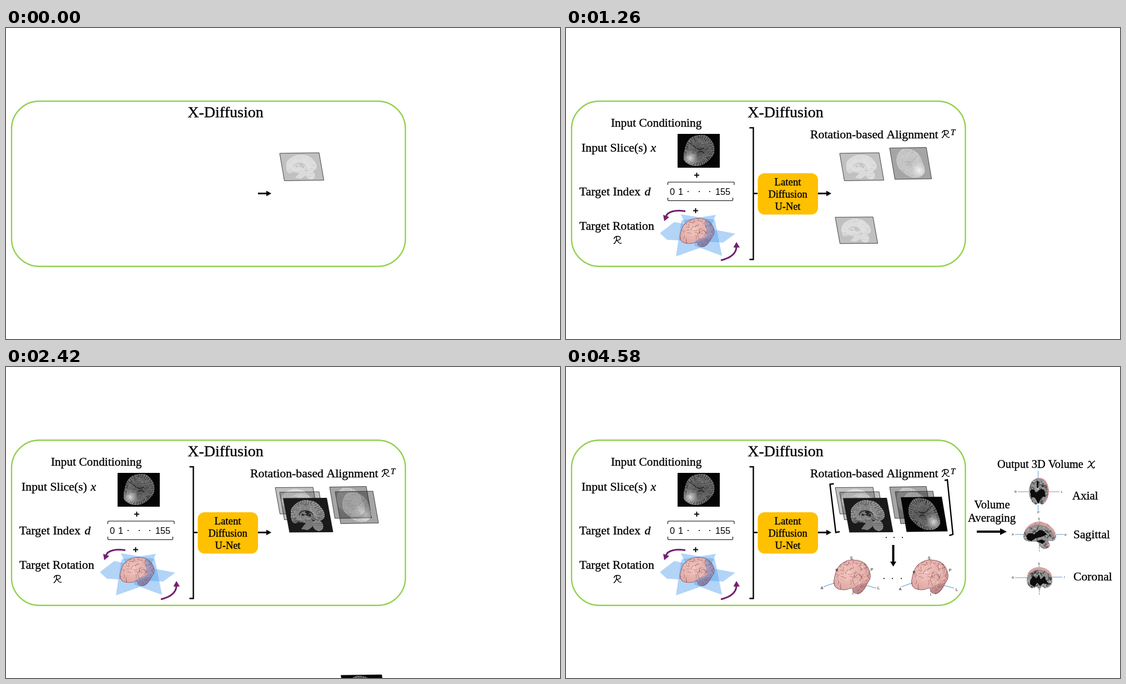
Animation of 998x561 px, one loop 5 s. Source, as an HTML page with a canvas:

```html
<!DOCTYPE html>
<html lang="en">
<head>
<meta charset="utf-8">
<title>X-Diffusion</title>
<style>
html, body { margin: 0; width: 100%; height: 100%; overflow: hidden; background: #fff; }
canvas { display: block; width: 998px; height: 561px; }
</style>
</head>
<body>
<canvas id="stage" width="998" height="561"></canvas>
<script>
const W = 998, H = 561, LOOP = 5000, STEP = 40;
const ctx = document.getElementById('stage').getContext('2d');
const SERIF = '"Liberation Serif", "Times New Roman", serif';
const SANS = '"Liberation Sans", Arial, sans-serif';
const BLUE = '#5b9bd5', PURPLE = '#74206f';

// ---------- helpers ----------
const rng = s => () => (s = s * 16807 % 2147483647) / 2147483647;

function closed(pts) {
  const p = new Path2D(), n = pts.length, at = i => pts[(i + n) % n];
  p.moveTo(...pts[0]);
  for (let i = 0; i < n; i++) {
    const [a, b, c, d] = [at(i - 1), at(i), at(i + 1), at(i + 2)];
    p.bezierCurveTo(b[0] + (c[0] - a[0]) / 6, b[1] + (c[1] - a[1]) / 6,
      c[0] - (d[0] - b[0]) / 6, c[1] - (d[1] - b[1]) / 6, c[0], c[1]);
  }
  p.closePath();
  return p;
}

function sprite(w, h, draw) {
  const el = document.createElement('canvas'), k = 3;
  el.width = w * k;
  el.height = h * k;
  const c = el.getContext('2d');
  c.scale(k, k);
  c.lineCap = c.lineJoin = 'round';
  draw(c, w, h);
  return el;
}

function glow(c, x, y, r, inner, outer) {
  const g = c.createRadialGradient(x, y, 0, x, y, r);
  g.addColorStop(0, inner);
  g.addColorStop(1, outer);
  return g;
}

function squiggles(c, w, h, n, len, color, width, seed) {
  const r = rng(seed);
  c.strokeStyle = color;
  c.lineWidth = width;
  for (let i = 0; i < n; i++) {
    const x = r() * w, y = r() * h, a = r() * 6.28, b = a + (r() - 0.5) * 3;
    const mx = x + Math.cos(a) * len, my = y + Math.sin(a) * len;
    c.beginPath();
    c.moveTo(x, y);
    c.quadraticCurveTo(mx, my, mx + Math.cos(b) * len, my + Math.sin(b) * len);
    c.stroke();
  }
}

function furrows(c, pts, cx, cy, depth, color, width) {
  const r = rng(71);
  c.strokeStyle = color;
  c.lineWidth = width;
  c.beginPath();
  pts.forEach(([x, y], i) => {
    const [nx, ny] = pts[(i + 1) % pts.length];
    for (const f of [0, 0.33, 0.67]) {
      const px = x + (nx - x) * f, py = y + (ny - y) * f, d = depth * (0.5 + r());
      c.moveTo(px, py);
      c.quadraticCurveTo(px + (cx - px) * d * 0.5 + r() * 4 - 2, py + (cy - py) * d * 0.5 + r() * 4 - 2,
        px + (cx - px) * d, py + (cy - py) * d);
    }
  });
  c.stroke();
}

// ---------- scans ----------
const axialPts = [[16, 41], [21, 23], [32, 9], [49, 3], [67, 4], [80, 15], [87, 31],
  [86, 47], [78, 59], [67, 69], [51, 76], [32, 75], [17, 65], [14, 53]];
const axial = sprite(100, 80, (c, w, h) => {
  c.fillStyle = '#050505';
  c.fillRect(0, 0, w, h);
  const p = closed(axialPts);
  c.clip(p);
  c.fillStyle = glow(c, 54, 38, 46, '#4c4c4c', '#7d7d7d');
  c.fillRect(0, 0, w, h);
  squiggles(c, w, h, 100, 4, 'rgba(160,160,160,.3)', 1.6, 12);
  squiggles(c, w, h, 45, 4, 'rgba(20,20,20,.5)', 1.3, 45);
  furrows(c, axialPts, 52, 40, 0.2, 'rgba(10,10,10,.7)', 1.2);
  c.fillStyle = glow(c, 30, 58, 20, 'rgba(235,235,235,.85)', 'rgba(200,200,200,0)');
  c.fillRect(0, 0, w, h);
  c.strokeStyle = 'rgba(15,15,15,.7)';
  c.lineWidth = 2;
  c.stroke(new Path2D('M46 35q8 4 16 -1M50 44q5 -5 12 1M36 27q5 3 7 8'));
});

const sagPts = [[10, 46], [13, 28], [23, 16], [36, 8], [51, 5], [71, 9], [83, 22],
  [88, 37], [84, 48], [74, 53], [60, 51], [52, 56], [40, 58], [28, 56], [19, 59], [12, 56]];
const sagittal = sprite(100, 80, (c, w, h) => {
  c.fillStyle = '#1a1a1a';
  c.fillRect(0, 0, w, h);
  c.fillStyle = '#777';
  c.fill(new Path2D('M48 50L60 54L55 67L43 75L28 72L37 63Z'));
  c.beginPath();
  c.ellipse(68, 64, 12, 13, 0, 0, 7);
  c.fillStyle = '#858585';
  c.fill();
  c.strokeStyle = '#555';
  c.lineWidth = 0.8;
  c.stroke(new Path2D('M58 60h20M57 64h22M58 68h20M60 72h15'));
  c.clip(closed(sagPts));
  c.fillStyle = glow(c, 45, 35, 46, '#797979', '#9a9a9a');
  c.fillRect(0, 0, w, h);
  squiggles(c, w, h, 90, 4, 'rgba(185,185,185,.3)', 1.6, 31);
  squiggles(c, w, h, 35, 4, 'rgba(40,40,40,.4)', 1.2, 83);
  furrows(c, sagPts, 46, 36, 0.24, 'rgba(30,30,30,.65)', 1.1);
  c.strokeStyle = '#333';
  c.lineWidth = 2.4;
  c.stroke(new Path2D('M30 39q5 -11 19 -9q9 1 12 9'));
  c.fillStyle = '#252525';
  c.beginPath();
  c.ellipse(50, 34, 6, 3.5, 0.3, 0, 7);
  c.ellipse(38, 39, 3, 2.5, 0, 0, 7);
  c.ellipse(59, 43, 4, 2, 0.7, 0, 7);
  c.fill();
});

// ---------- surface brains ----------
const brainPts = [[3, 47], [4, 33], [10, 17], [23, 6], [39, 3], [56, 8], [66, 21], [68, 35],
  [63, 45], [56, 57], [47, 64], [38, 61], [35, 54], [22, 57], [10, 55]];
const brainPath = closed(brainPts);
const brain = sprite(71, 68, (c, w, h) => {
  c.fillStyle = glow(c, 28, 26, 46, '#f3c4bd', '#d79d9b');
  c.fill(brainPath);
  c.save();
  c.clip(brainPath);
  squiggles(c, w, h, 85, 4.5, 'rgba(150,92,94,.65)', 0.9, 7);
  squiggles(c, w, h, 50, 3.5, 'rgba(255,222,215,.6)', 1.2, 19);
  c.fillStyle = 'rgba(120,75,85,.3)';
  c.fill(new Path2D('M36 54L50 46L66 43L60 62L40 66Z'));
  c.restore();
  c.strokeStyle = '#8f6267';
  c.lineWidth = 1;
  c.stroke(brainPath);
});

// Cut volume: pink cortex with a grey section in front.
function section(w, h, pts, shift, holes, seed) {
  const path = closed(pts);
  return sprite(w, h, c => {
    c.fillStyle = '#d9a3a1';
    c.fill(path);
    c.clip(path);
    squiggles(c, w, h, 35, 3, 'rgba(130,80,85,.6)', 0.8, seed);
    c.translate(...shift);
    c.clip(path);
    c.fillStyle = '#929292';
    c.fillRect(0, 0, w, h);
    squiggles(c, w, h, 60, 3, 'rgba(40,40,40,.55)', 1.8, seed + 5);
    squiggles(c, w, h, 30, 3, 'rgba(210,210,210,.5)', 1.6, seed + 9);
    c.fillStyle = '#0c0c0c';
    c.fill(new Path2D(holes));
  });
}
const cutAxial = section(38, 52,
  [[1, 28], [3, 14], [9, 5], [19, 1], [29, 4], [35, 14], [37, 28], [33, 41], [26, 49], [19, 47], [12, 49], [5, 41]],
  [-2, 1], 'M5 24q4 -7 9 0q2 5 5 0q6 -7 12 -1l2 12q-6 -3 -9 3l-4 9l-5 -9q-3 -5 -8 -2zM17 6h3v12h-3z', 101);
const cutSagittal = section(61, 51,
  [[1, 28], [4, 16], [13, 6], [28, 1], [44, 5], [56, 16], [60, 29], [54, 36], [46, 36], [49, 45], [40, 50], [32, 47], [27, 38], [14, 37], [5, 35]],
  [-2, 5], 'M8 22q6 -9 14 -3l10 -8q9 1 13 8l-8 4l-12 3l-8 5l-7 -3zM28 31l8 -3l6 3l-5 5z', 211);
const cutCoronal = section(48, 44,
  [[1, 26], [3, 13], [11, 4], [23, 1], [36, 4], [45, 13], [47, 26], [43, 35], [34, 39], [28, 36], [24, 42], [19, 37], [10, 39], [4, 34]],
  [0, 5], 'M7 20l6 -9l5 6l5 -8l3 9l7 -6l2 6l5 9l-9 -2l-6 5l-5 -6l-5 7l-8 -4z', 307);

// ---------- drawing ----------
function stroke(d, width, color = '#000') {
  ctx.strokeStyle = color;
  ctx.lineWidth = width;
  ctx.stroke(new Path2D(d));
}

function fill(d, color) {
  ctx.fillStyle = color;
  ctx.fill(new Path2D(d));
}

function label(s, x, y, size, align = 'left', style = '', family = SERIF) {
  ctx.font = `${style} ${size}px ${family}`;
  ctx.textAlign = align;
  ctx.fillStyle = ctx.strokeStyle = '#000';
  ctx.fillText(s, x, y);
  if (family === SERIF) {
    ctx.lineWidth = 0.35;
    ctx.strokeText(s, x, y);
  }
}

const tiny = (s, x, y, size = 7) => label(s, x, y + size * 0.36, size, 'center', '', SANS);

function script(d, x, y) {
  ctx.save();
  ctx.translate(x, y);
  stroke(d, 1.5);
  ctx.restore();
}
const scriptR = 'M6 1.5C7 6 5 12 1 14.5M1.5 5.5C2 0 13 -1 13 4C12.5 8 8 8 6 8C9.5 8 9 15.5 15 13';
const scriptX = 'M2 3.5C5 -1 6.5 4 7.5 8C8.5 13 10.5 17 13.5 12M14 1.5C9 2 5 14 0 14';

function arrow(x1, y1, x2, y2, width, head, half) {
  const len = Math.hypot(x2 - x1, y2 - y1), ux = (x2 - x1) / len, uy = (y2 - y1) / len;
  const bx = x2 - ux * head, by = y2 - uy * head;
  stroke(`M${x1} ${y1}L${bx + ux} ${by + uy}`, width);
  fill(`M${x2} ${y2}L${bx - uy * half} ${by + ux * half}L${bx + uy * half} ${by - ux * half}Z`, '#000');
}

function dots(xs, y, r) {
  ctx.fillStyle = '#000';
  for (const x of xs) {
    ctx.beginPath();
    ctx.arc(x, y, r, 0, 7);
    ctx.fill();
  }
}

const plus = (x, y) => stroke(`M${x - 4.5} ${y}h9M${x} ${y - 4.5}v9`, 1.9);

// Slice: image, alpha, top left corner, top edge vector, side edge vector
const slices = [
  [sagittal, 0.28, 493, 226, 71, -1, 8.5, 49.5],
  [axial, 0.36, 583, 216.5, 66, -1, 9.5, 56.5],
  [sagittal, 0.28, 485, 217.5, 68, -0.5, 8.5, 47.5],
  [axial, 0.36, 593, 225, 68, -1, 10, 57.5],
  [sagittal, 1, 499, 236.5, 79, -0.5, 11.5, 62],
  [axial, 1, 603, 235, 74, -1, 10.5, 62.5]
];

function slice([img, alpha, x, y, ux, uy, vx, vy], dy) {
  ctx.save();
  ctx.translate(x, y + dy);
  ctx.save();
  ctx.transform(ux / 100, uy / 100, vx / 80, vy / 80, 0, 0);
  if (img === axial) ctx.transform(-1, 0, 0, 1, 100, 0);
  ctx.globalAlpha = alpha;
  ctx.drawImage(img, 0, 0, 100, 80);
  ctx.restore();
  if (alpha < 1) stroke(`M0 0l${ux} ${uy}l${vx} ${vy}l${-ux} ${-uy}Z`, 0.9, '#333');
  ctx.restore();
}

function rotationIcon() {
  const tint = 'rgba(85,160,238,.45)';
  fill('M207 336L268 346L281 411L232 393Z', tint);
  fill('M270 337L208 347L198 412L246 395Z', tint);
  fill('M169 370L195 350L305 371L283 387L182 382Z', tint);
  ctx.save();
  ctx.translate(203, 341);
  ctx.scale(0.94, 0.84);
  ctx.drawImage(brain, 0, 0, 71, 68);
  ctx.clip(brainPath);
  fill('M50 0L71 0V68H20L34 50L54 40Z', 'rgba(60,120,205,.42)');
  ctx.restore();
  stroke('M215 330.5C199 328 182 330 180 341', 3, PURPLE);
  fill('M177 348.5L175 337L186 341Z', PURPLE);
  stroke('M279 419C296 415 307 408 307 394', 3, PURPLE);
  fill('M307 386L301.5 396L313 396Z', PURPLE);
}

function conditioning() {
  label('Input Conditioning', 81, 178, 21.4);
  label('Input Slice(s) ', 28, 223, 21.8);
  label('x', 152.5, 223, 22, 'left', 'italic');
  label('Target Index ', 24, 302, 21.8);
  label('d', 141.5, 302, 21.8, 'left', 'italic');
  label('Target Rotation', 24, 364, 21.7);
  script(scriptR, 85, 375);
  ctx.drawImage(axial, 201, 191, 76, 60.5);
  plus(235.5, 265.5);
  plus(233.5, 329.5);
  stroke('M183.5 283V279Q183.5 278 185 278H302Q303 278 303 279V283M183.5 306V310Q183.5 311.5 185 311.5H299Q300.5 311.5 300.5 310V306', 1.1);
  label('0', 187, 301, 16.3, 'left', '', SANS);
  label('1', 202, 301, 16.3, 'left', '', SANS);
  label('155', 269, 301, 16.3, 'left', '', SANS);
  dots([220, 240, 259], 295, 1.1);
  rotationIcon();
  stroke('M330.5 180H337.5V417.5H330.5M337.5 298.5H345', 2.4);
  ctx.fillStyle = '#ffc000';
  ctx.beginPath();
  ctx.roundRect(345.5, 262, 108.5, 74.5, 12);
  ctx.fill();
  label('Latent', 399.5, 284, 18.8, 'center');
  label('Diffusion', 399.5, 306, 18.4, 'center');
  label('U-Net', 399.5, 328, 18.4, 'center');
  label('Rotation-based Alignment', 440, 198.5, 21.8);
  script(scriptR, 676, 184);
  label('T', 693, 193, 14.5, 'left', 'italic');
}

function aligned(dx, dy, marks) {
  stroke(`M${464 + dx} 396.5L${488 + dx} 388M${534 + dx} 392L${559 + dx} 399M${514.5 + dx} 347v5M${517 + dx} 402v4`, 1.1, BLUE);
  ctx.drawImage(brain, 480 + dx, 345 + dy, 71, 68);
  marks.forEach(([s, x, y]) => tiny(s, x, y));
}

function alignedPair() {
  aligned(0, 0, [['S', 514, 344], ['R', 488, 366], ['P', 551, 365], ['L', 563, 398], ['A', 461, 398], ['I', 517, 408]]);
  aligned(140, 0, [['S', 654, 344], ['R', 627, 370], ['P', 692, 366], ['L', 704, 401], ['A', 602, 400], ['I', 657, 410]]);
  dots([573, 588, 604], 381.5, 1.1);
  label('Coronal', 914, 385, 21.7);
}

function view(img, x, y, w, h, d, marks) {
  stroke(d, 1, BLUE);
  ctx.drawImage(img, x, y, w, h);
  marks.forEach(([s, mx, my]) => tiny(s, mx, my, 5));
}

function output() {
  dots([577, 591, 606], 307.5, 1.1);
  arrow(589.5, 321, 589.5, 360, 4, 9, 5.5);
  label('Volume', 767.5, 255, 20.8, 'center');
  label('Averaging', 767, 279, 20.8, 'center');
  arrow(740, 297, 794, 297, 4, 12, 6);
  label('Output 3D Volume', 777, 182, 20.4);
  script(scriptX, 939, 168);
  view(cutAxial, 833, 199, 38, 52, 'M814 225H834M869 225H889M850.5 187V201M850.5 249V259',
    [['R', 810, 225], ['L', 893, 225], ['P', 851, 262]]);
  view(cutSagittal, 823, 278, 61, 51, 'M809 302H825M883 302H897M852.5 277V281M852.5 315V328',
    [['A', 805, 302], ['P', 900, 303], ['S', 852, 274], ['I', 853, 331]]);
  view(cutCoronal, 829, 360, 48, 44, 'M809 380H831M876 379H894M852.5 358V363M852.5 399V406',
    [['R', 805, 380], ['I', 898, 379], ['S', 852, 355], ['I', 853, 409]]);
  label('Axial', 912, 239, 21);
  label('Sagittal', 914, 309, 21.6);
}

const FIRST = 460, FLY = 488;

function render(time) {
  const t = time < FIRST ? 0 : FIRST + Math.floor((time - FIRST) / STEP) * STEP;
  ctx.fillStyle = '#fff';
  ctx.fillRect(0, 0, W, H);
  ctx.strokeStyle = '#92d050';
  ctx.lineWidth = 2.4;
  ctx.beginPath();
  ctx.roundRect(10, 132, 709.5, 298, 50);
  ctx.stroke();
  label('X-Diffusion', 395.5, 161, 28, 'center');
  if (t >= FIRST) conditioning();
  arrow(454, 298.5, 478, 298.5, 3, 9, 5);

  // Each slice rises from below the stage as the previous one lands.
  slices.forEach((s, i) => {
    const p = i ? Math.min(1, (t - FIRST - FLY * (i - 1)) / FLY) : 1;
    if (p > 0) slice(s, (H - s[3]) * (1 - p));
  });

  if (t >= 3320) alignedPair();
  if (t >= 3740) stroke('M482.5 210.5L475.5 211.5L486 298.5L493 297', 2.4);
  if (t >= 4160) stroke('M682 204.5L687 203.5L697 302L690.5 304', 2.4);
  if (t >= 4580) output();
}

const start = performance.now();
function tick() {
  render((performance.now() - start) % LOOP);
  requestAnimationFrame(tick);
}
tick();
</script>
</body>
</html>
```
